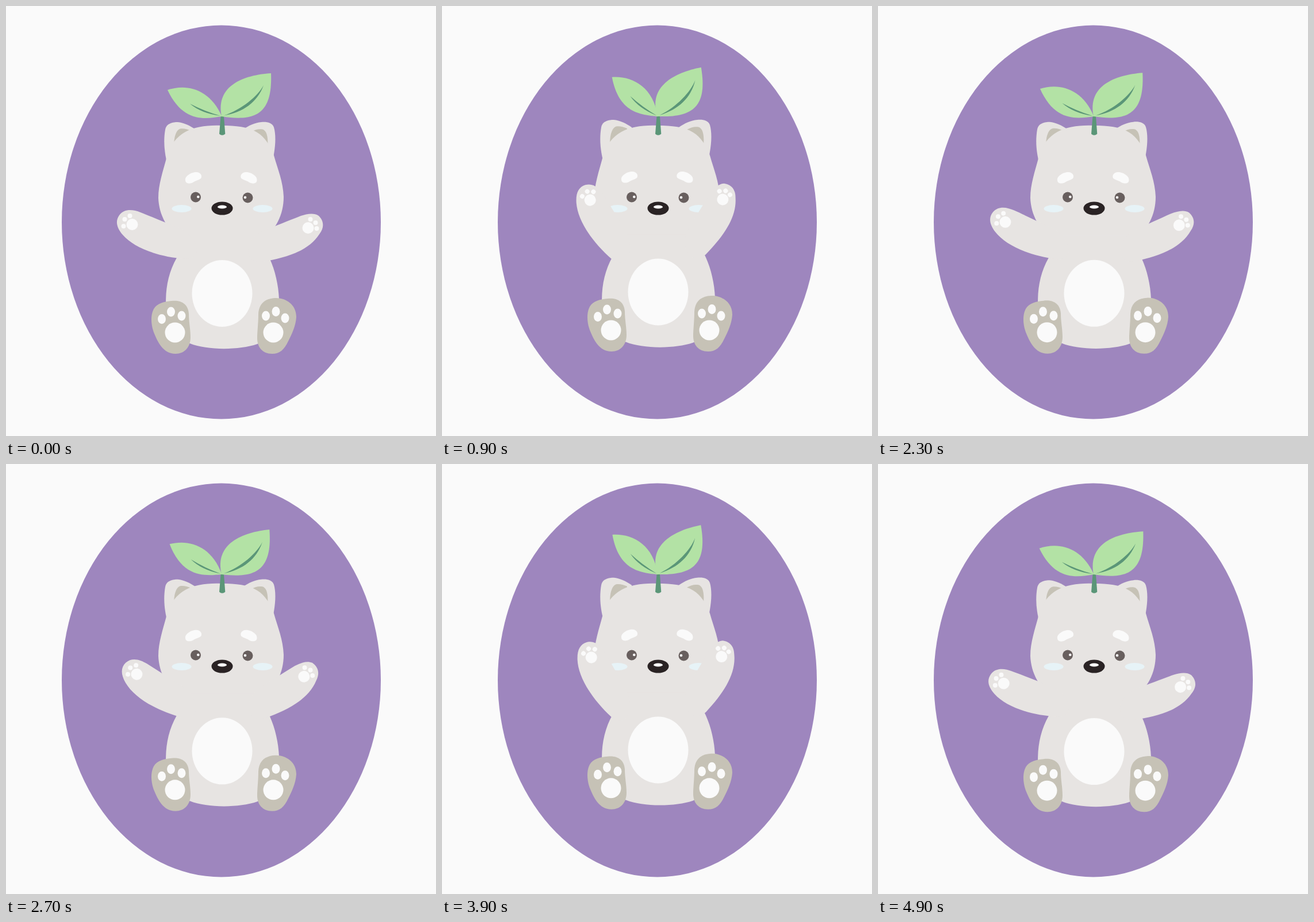
An HTML page for the animation above (5 s loop, 748 by 748 pixels).

```html
<!DOCTYPE html>
<html lang="en">
<head>
<meta charset="utf-8">
<title>Waving bear cub</title>
<style>
  html, body { margin: 0; width: 100%; height: 100%; overflow: hidden; background: #fafafa; }
  svg { display: block; width: 100%; height: 100%; }
  .fur { fill: #e7e4e2; }
  .sole { fill: #c6c2b6; }
  .white { fill: #fafafa; }
  .leaf { fill: #b3e2a5; }
  .vein { fill: #5b9678; }
  .cheek { fill: #e7f3f7; }
  .eye { fill: #685f5e; }
  .nose { fill: #2a2324; }
</style>
</head>
<body>
<svg viewBox="0 0 748 748">
  <ellipse cx="374.5" cy="376" rx="277.5" ry="342.5" fill="#9e86be"/>

  <g id="ears">
    <path class="fur" d="M279 268C275 250 274 232 277 215C279 204 290 202 299 202C309 203 320 208 330 215V268Z"/>
    <path class="fur" d="M464 268C469 245 470 225 466 211C463 202 452 201 444 202C433 203 422 208 412 215V268Z"/>
    <path class="sole" d="M292 246C292 232 294 217 303 213.500C309 212.500 315 214 322 217V246Z"/>
    <path class="sole" d="M455 246C456 232 455 217 446 214.500C439 213.500 433 215 426 219V246Z"/>
  </g>

  <path class="fur" d="M375 208C350 207 328 210 312 219C293 230 284 246 279 265C273 288 265 310 265 334C266 362 280 392 310 410H440C470 392 483 362 483 332C482 305 473 285 466 260C462 248 452 229 437 220C421 210 400 208 375 208Z"/>

  <g id="body">
    <path class="fur" d="M310 400L297 438C280 468 276 500 279 535C283 565 300 585 320 587C350 599 405 599 437 588C460 578 474 550 475 510C474 485 468 460 459 440L440 400Z"/>
  </g>

  <ellipse class="cheek" cx="305.500" cy="352.500" rx="17" ry="6.500"/>
  <ellipse class="cheek" cx="446.500" cy="352.500" rx="17" ry="6.500"/>

  <g id="armL">
    <path class="fur" d="M312 440C262 436 222 420 203 398C192 385 190 374 197 364C206 352 221 354 234 359C252 366 278 377 300 386C335 400 345 441 312 440Z"/>
    <g class="white">
      <circle cx="219.500" cy="380" r="10"/>
      <circle cx="204.500" cy="383" r="4"/>
      <circle cx="206.500" cy="371" r="4"/>
      <circle cx="215.500" cy="365" r="4"/>
    </g>
  </g>
  <g id="armR">
    <path class="fur" d="M445 445C490 438 527 425 545 397C555 384 552 373 544 365C535 359 523 362 513 365C495 372 470 382 450 390C415 403 410 448 445 445Z"/>
    <g class="white">
      <circle cx="525.500" cy="386" r="10"/>
      <circle cx="529.500" cy="371" r="4"/>
      <circle cx="538.500" cy="377" r="4"/>
      <circle cx="540.500" cy="387" r="4"/>
    </g>
  </g>

  <ellipse id="belly" class="white" cx="376" cy="500" rx="52.500" ry="58"/>

  <g id="brows" class="white">
    <path id="brow" d="M312 303C311 296 322 289 331 289C339 289 342 296 339 300C335 303 329 304 325 307C319 310 312 309 312 303Z"/>
    <use href="#brow" transform="translate(748.500 0) scale(-1 1)"/>
  </g>

  <circle class="eye" cx="330" cy="332.500" r="9"/>
  <circle class="white" cx="334.300" cy="332" r="2.300"/>
  <circle class="eye" cx="420.500" cy="333.500" r="9"/>
  <circle class="white" cx="416" cy="333" r="2.300"/>
  <ellipse class="nose" cx="376" cy="352" rx="18.500" ry="11.500"/>
  <ellipse class="white" cx="376" cy="349.500" rx="8" ry="3"/>

  <g id="feet">
    <path class="sole" d="M288 513C304 511 317 518 318 535C318 550 321 562 321 576C321 594 310 605 295 605C273 605 264 584 258 570C252 556 251 538 257 527C263 517 275 514 288 513Z"/>
    <path class="sole" d="M468 508C482 507 505 516 505 541C504 557 497 571 491 583C484 598 476 605 463 605C446 605 437 593 437 578C437 566 439 551 439 536C440 518 450 509 468 508Z"/>
    <g class="white">
      <circle cx="294" cy="568" r="17.500"/>
      <ellipse cx="271" cy="544.500" rx="7" ry="8.500"/>
      <ellipse cx="287" cy="532" rx="7" ry="8.500"/>
      <ellipse cx="305.500" cy="539" rx="7" ry="8.500"/>
      <circle cx="465" cy="568" r="17.500"/>
      <ellipse cx="452" cy="539" rx="7" ry="8.500"/>
      <ellipse cx="469.500" cy="531.500" rx="7" ry="8.500"/>
      <ellipse cx="485.500" cy="543" rx="7" ry="8.500"/>
    </g>
  </g>

  <path class="vein" d="M373.500 192L371 222.500Q376 227 381.300 222.500L379 192Z"/>
  <g id="leafL">
    <path class="leaf" d="M281 146C313 135 354 143 375.500 192C345 197 308 203 281 146Z"/>
    <path class="vein" d="M320 170Q340 187 373 191Q345 183 320 170Z"/>
  </g>
  <g id="leafR">
    <path class="leaf" d="M375 192C364 138 414 120 461 117C464 190 432 201 375 192Z"/>
    <path class="vein" d="M448 138C438 157 410 180 379 190.500C412 185 437 168 448 138Z"/>
  </g>
</svg>
<script>
const LOOP = 5000, STEP = 100;
// Turning points of the wave: [ms, lift], linear in between.
const turns = [[0, 0], [1190, 0.97], [2407, -0.03], [3641, 0.97], [4892, -0.03], [5000, 0.06]];
const parts = Object.fromEntries(
  [...document.querySelectorAll('g[id], #belly')].map(el => [el.id, el]));

function liftAt(t) {
  const i = turns.findIndex(([end]) => t < end);
  const [t0, a] = turns[i - 1], [t1, b] = turns[i];
  return a + (b - a) * (t - t0) / (t1 - t0);
}

const rise = (id, dy) => parts[id].setAttribute('transform', `translate(0 ${-dy})`);
const turn = (id, deg, x, y) => parts[id].setAttribute('transform', `rotate(${deg} ${x} ${y})`);

function draw(ms) {
  const lift = liftAt(Math.floor((ms % LOOP) / STEP) * STEP);
  rise('ears', 5.5 * lift);
  rise('feet', 5.5 * lift);
  rise('body', 3.4 * lift);
  rise('belly', 3.4 * lift);
  rise('brows', 1.5 * lift);
  turn('armL', 50 * lift, 302.5, 416.4);
  turn('armR', -50 * lift, 432.3, 417.3);
  turn('leafL', 20 * lift, 375, 192);
  turn('leafR', -10 * lift, 375, 192);
}

let start;
function tick(now) {
  start ??= now;
  draw(Math.max(0, now - start));
  requestAnimationFrame(tick);
}
draw(0);
requestAnimationFrame(tick);
</script>
</body>
</html>
```
